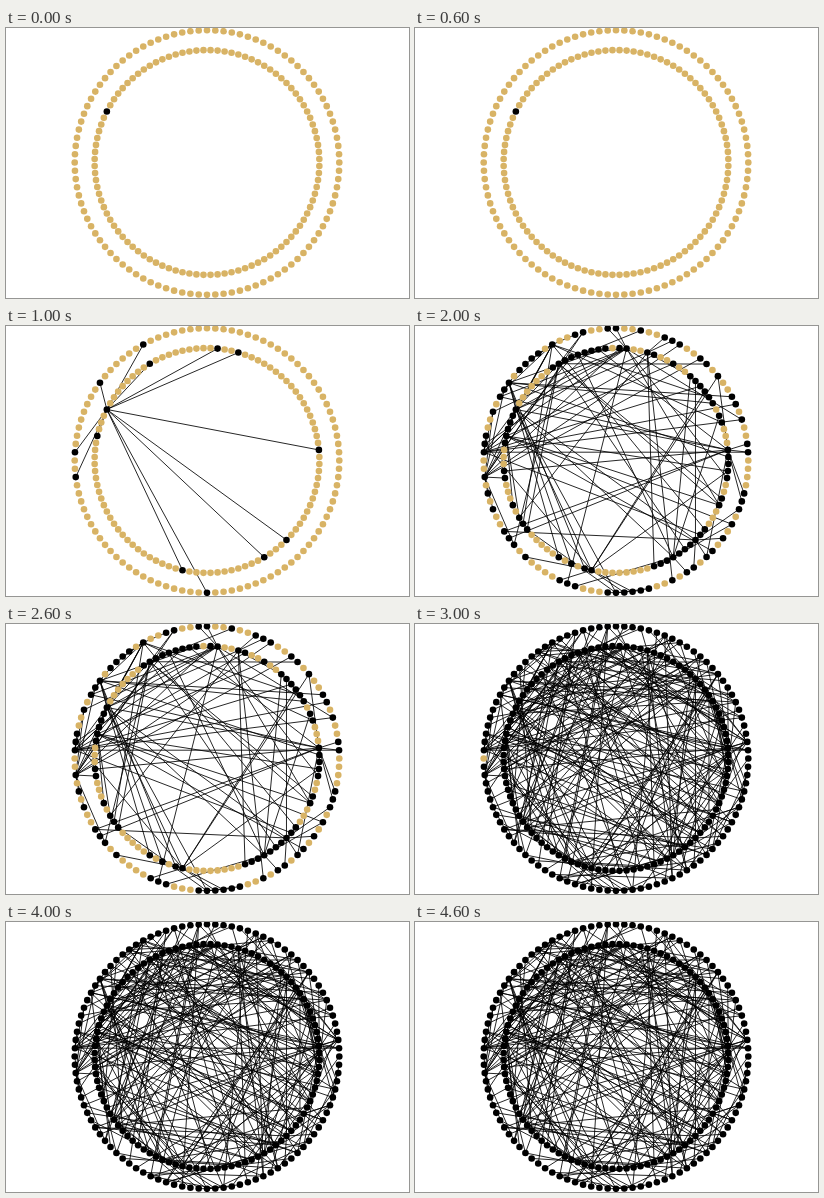
Write an HTML page that moves like this. It is 403 px wide and 270 px high and loops after 5 s.

```html
<!DOCTYPE html>
<html lang="en">
<head>
<meta charset="utf-8">
<title>Spreading through a network</title>
<style>
  html, body { margin: 0; width: 100%; height: 100%; overflow: hidden; background: #fff; }
  svg { display: block; width: 100%; height: 100%; }
</style>
</head>
<body>
<svg id="stage" viewBox="0 0 403 270"></svg>
<script>
const STEP = 1000, STEPS = 5, RING = 100;
const CENTER = { x: 201, y: 134.5 };
const GOLD = '#d8b365';
const ROOT = 57, LAST = 150, LAST_PARENT = 145;

// Nodes 0-99 form the inner ring, 100-199 the outer ring, clockwise from the right.
const firstLinks = [53, 66, 76, 79, 98, 12, 16, 28, 125, 167, 160, 151, 148];
const secondLinks = {
  160: [158, 159, 162, 33, 31, 91, 73, 29, 99, 192],
  167: [163, 164, 165, 170, 10, 90, 94, 56, 55, 40],
  151: [152, 153, 156, 71, 88, 80, 193, 54],
  148: [144, 146, 75, 183, 67, 47, 186, 52],
  53: [83, 68, 108, 43, 112],
  66: [65, 69, 171, 5, 14, 139, 178, 187],
  76: [70, 174, 2, 6, 131, 195, 175],
  79: [181, 182, 41, 19, 86, 118],
  98: [72, 0, 198, 199, 105, 140, 189, 48, 104],
  12: [87, 11, 106, 110, 113, 115, 13, 15, 141],
  16: [116, 17, 18, 93, 130],
  28: [89, 132, 123, 137, 1, 124],
  125: [121, 122, 126, 39]
};

let seed = 11;
function random() {
  seed = (seed * 16807) % 2147483647;
  return seed / 2147483647;
}
const pick = list => list[Math.floor(random() * list.length)];

const nodes = Array.from({ length: 2 * RING }, (_, id) => {
  const outer = id >= RING;
  const radius = outer ? 132.3 : 112.4;
  const angle = (id % RING + (outer ? 0 : 0.5)) * 2 * Math.PI / RING;
  return {
    x: CENTER.x + radius * Math.cos(angle),
    y: CENTER.y + radius * Math.sin(angle),
    level: 3
  };
});
const edges = [];

function link(from, to, level) {
  edges.push({ from, to, level });
}
function reach(from, to, level) {
  nodes[to].level = level;
  link(from, to, level);
}

function buildNetwork() {
  nodes[ROOT].level = 0;
  firstLinks.forEach(id => reach(ROOT, id, 1));
  for (const hub in secondLinks) {
    secondLinks[hub].forEach(id => reach(+hub, id, 2));
  }
  const second = Object.values(secondLinks).flat();
  for (let i = 0; i < 25; i++) link(pick(firstLinks), pick(second), 2);
  nodes.forEach((node, id) => {
    if (node.level === 3 && id !== LAST) link(pick(second), id, 3);
  });
  for (let i = 0; i < 70; i++) link(pick(second), pick(second), 3);
  reach(LAST_PARENT, LAST, 4);
}

const stage = document.getElementById('stage');
function add(parent, tag, attributes) {
  const element = document.createElementNS('http://www.w3.org/2000/svg', tag);
  for (const name in attributes) element.setAttribute(name, attributes[name]);
  return parent.appendChild(element);
}

buildNetwork();
const edgeLayers = Array.from({ length: STEPS }, (_, level) => {
  const d = edges.filter(edge => edge.level === level).map(({ from, to }) => {
    const a = nodes[from], b = nodes[to];
    return `M${a.x} ${a.y}L${b.x} ${b.y}`;
  }).join('');
  return add(stage, 'path', { d, fill: 'none', stroke: '#000', 'stroke-width': 0.85 });
});
const dots = nodes.map(({ x, y }) => add(stage, 'circle', { cx: x, cy: y, r: 3.3 }));

function render(time) {
  const step = Math.floor(time / STEP) % STEPS;
  edgeLayers.forEach((path, level) => {
    path.style.display = level <= step ? '' : 'none';
  });
  dots.forEach((dot, id) => {
    dot.setAttribute('fill', nodes[id].level <= step ? '#000' : GOLD);
  });
}

const start = performance.now();
function tick() {
  render(performance.now() - start);
  requestAnimationFrame(tick);
}
tick();
</script>
</body>
</html>
```
